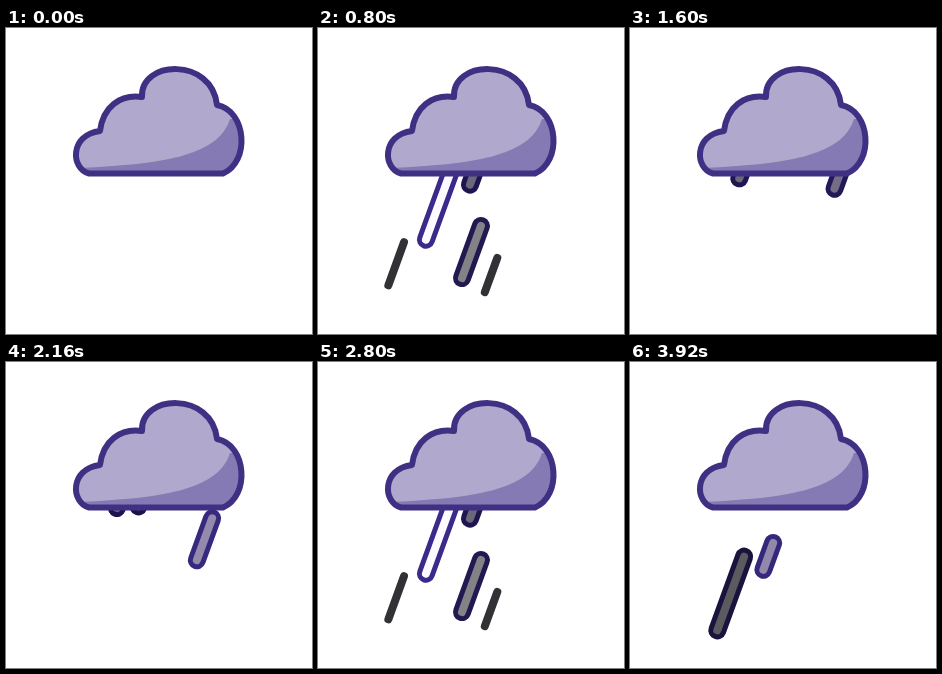
These frames come from a looping animation (306 by 306 pixels, 4000 ms). An HTML page with a canvas:

```html
<!DOCTYPE html>
<html lang="en">
<head>
<meta charset="utf-8">
<title>Rain cloud</title>
<style>
  html, body { margin: 0; width: 100%; height: 100%; overflow: hidden; background: #fff; }
  canvas { display: block; width: 306px; height: 306px; }
</style>
</head>
<body>
<canvas id="stage" width="306" height="306"></canvas>
<script>
const ctx = document.getElementById('stage').getContext('2d');
const STEP = 80, STEPS = 25;               // picture rate and loop length
const LIFE = 5, GONE = .93, THIN = .85;    // drop life in steps, then ages
const TOP = 120, SLANT = .364;

const cloud = new Path2D('M83 145.5C65 141 63 107 94 103C97 79 114 66 136 69C134 32 206 29 211 77C241 83 244 134 217 145.5Z');
const shade = new Path2D('M76 140C150 136 212 130 224 91L245 91V150H76Z');

// Each lane drops one streak at every birth step.
const lanes = [
  { x: 132, length: 21, reach: 90, births: [14.1] },
  { x: 164, length: 59, reach: 139, births: [1.4, 5.5, 19.3] },
  { x: 185, length: 97, reach: 156, births: [1.5, 8, 20] },
  { x: 209, length: 30, reach: 168, births: [9.3, 22.25] },
  { x: 216, length: 35, reach: 114, births: [14.1] },
  { x: 235, length: 66, reach: 146, births: [6.5] },
  { x: 240, length: 104, reach: 195, births: [13.5] },
  { x: 263, length: 47, reach: 146, births: [.2, 5.5, 19.1] }
];

// A streak brightens, flashes white and burns out.
const tones = [
  { age: 0, outline: [14, 10, 52], core: [85, 80, 92] },
  { age: .36, outline: [54, 41, 126], core: [148, 138, 172] },
  { age: .4, outline: [59, 42, 138], core: [252, 250, 255] },
  { age: 1, outline: [8, 8, 22], core: [10, 10, 14] }
];

const mix = (a, b, k) => `rgb(${a.map((v, i) => v + (b[i] - v) * k)})`;

function drawDrop({ x, length, reach }, age) {
  if (age <= 0 || age >= GONE) return;
  const head = TOP + reach * Math.sin(age * Math.PI / 2);
  const tail = Math.max(TOP, head - length * (1 - .3 * age));
  const next = tones.findIndex(t => t.age >= age);
  const a = tones[next - 1], b = tones[next];
  const k = (age - a.age) / (b.age - a.age);
  const line = (part, width) => {
    ctx.strokeStyle = mix(a[part], b[part], k);
    ctx.lineWidth = width;
    ctx.beginPath();
    ctx.moveTo(x - SLANT * tail, tail);
    ctx.lineTo(x - SLANT * head, head);
    ctx.stroke();
  };
  if (age < THIN) line('outline', 18);
  line('core', 8);
}

function drawCloud() {
  ctx.fillStyle = '#b0a8cd';
  ctx.fill(cloud);
  ctx.save();
  ctx.clip(cloud);
  ctx.fillStyle = '#857ab3';
  ctx.fill(shade);
  ctx.restore();
  ctx.strokeStyle = '#403083';
  ctx.lineWidth = 6;
  ctx.stroke(cloud);
}

function frame() {
  const step = Math.floor(performance.now() / STEP) % STEPS;
  ctx.fillStyle = '#fff';
  ctx.fillRect(0, 0, 306, 306);
  ctx.lineCap = ctx.lineJoin = 'round';
  for (const lane of lanes)
    for (const birth of lane.births) drawDrop(lane, (step - birth) / LIFE);
  drawCloud();
  requestAnimationFrame(frame);
}
frame();
</script>
</body>
</html>
```
